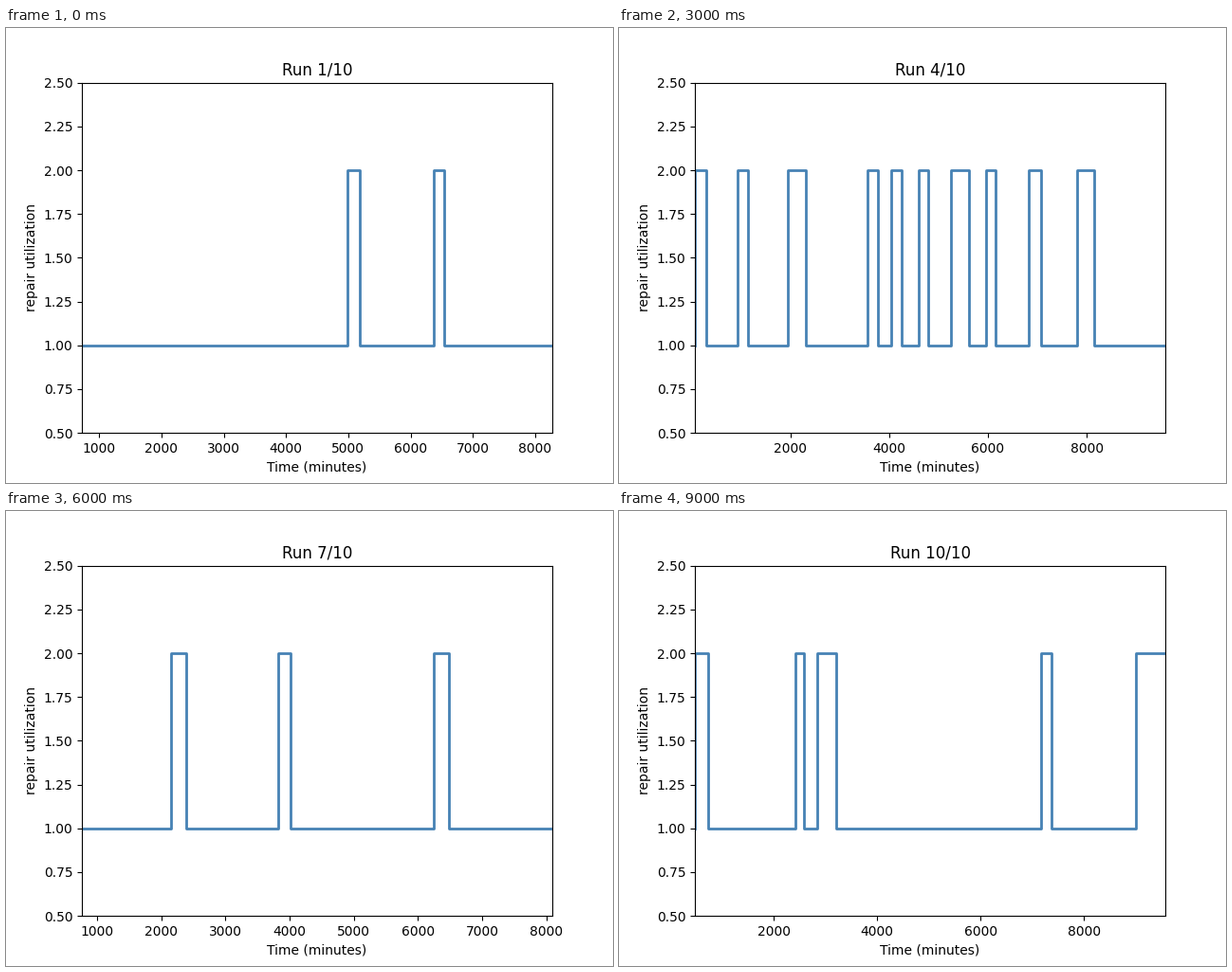
These frames come from a looping animation (640x480 px, 10 s). A matplotlib script:

```python
import matplotlib.pyplot as plt
from matplotlib.animation import FuncAnimation

# Each run: start time, end time, moments at which utilization flips between 1 and 2
RUNS = [
    (721, 8277, [4994, 5177, 6380, 6533]),
    (640, 9420, [1850, 2080, 3900, 4160, 6750, 6980, 9240]),
    (148, 8971, [148, 388, 2701, 2985, 3110, 3359, 3857, 4106, 7931, 8055]),
    (64, 9592, [64, 304, 938, 1149, 1937, 2321, 3551, 3781, 4031, 4261,
                4588, 4799, 5260, 5625, 5952, 6144, 6835, 7085, 7796, 8142]),
    (444, 9479, [444, 690, 2238, 2475, 3003, 3222, 3604, 3732,
                 6519, 6901, 8194, 8431, 9214, 9397]),
    (1121, 9507, [1806, 2009, 4038, 4308, 5306, 5779, 5982, 6134]),
    (764, 8090, [2150, 2390, 3820, 4010, 6240, 6480]),
    (733, 8440, [1036, 1269, 1440, 1580, 1782, 1937,
                 2497, 2730, 5496, 5666, 8059, 8338]),
    (300, 9400, [1720, 1950, 4380, 4640, 5900, 6090, 7650, 7890]),
    (471, 9576, [471, 719, 2408, 2573, 2830, 3215, 7180, 7382, 8998]),
]

fig, ax = plt.subplots(figsize=(6.4, 4.8), dpi=100)
line, = ax.step([], [], where="post", color="steelblue", linewidth=2)
ax.set_ylim(0.5, 2.5)
ax.set_xlabel("Time (minutes)")
ax.set_ylabel("repair utilization")


def draw_run(i):
    start, end, flips = RUNS[i]
    levels = [1 + k % 2 for k in range(len(flips) + 1)]
    line.set_data([start, *flips, end], levels + levels[-1:])
    ax.set_xlim(start, end)
    ax.set_title(f"Run {i + 1}/{len(RUNS)}")
    return line,


anim = FuncAnimation(fig, draw_run, frames=len(RUNS), interval=1000,
                     init_func=lambda: draw_run(0), repeat=True, repeat_delay=0)
plt.show()
```
